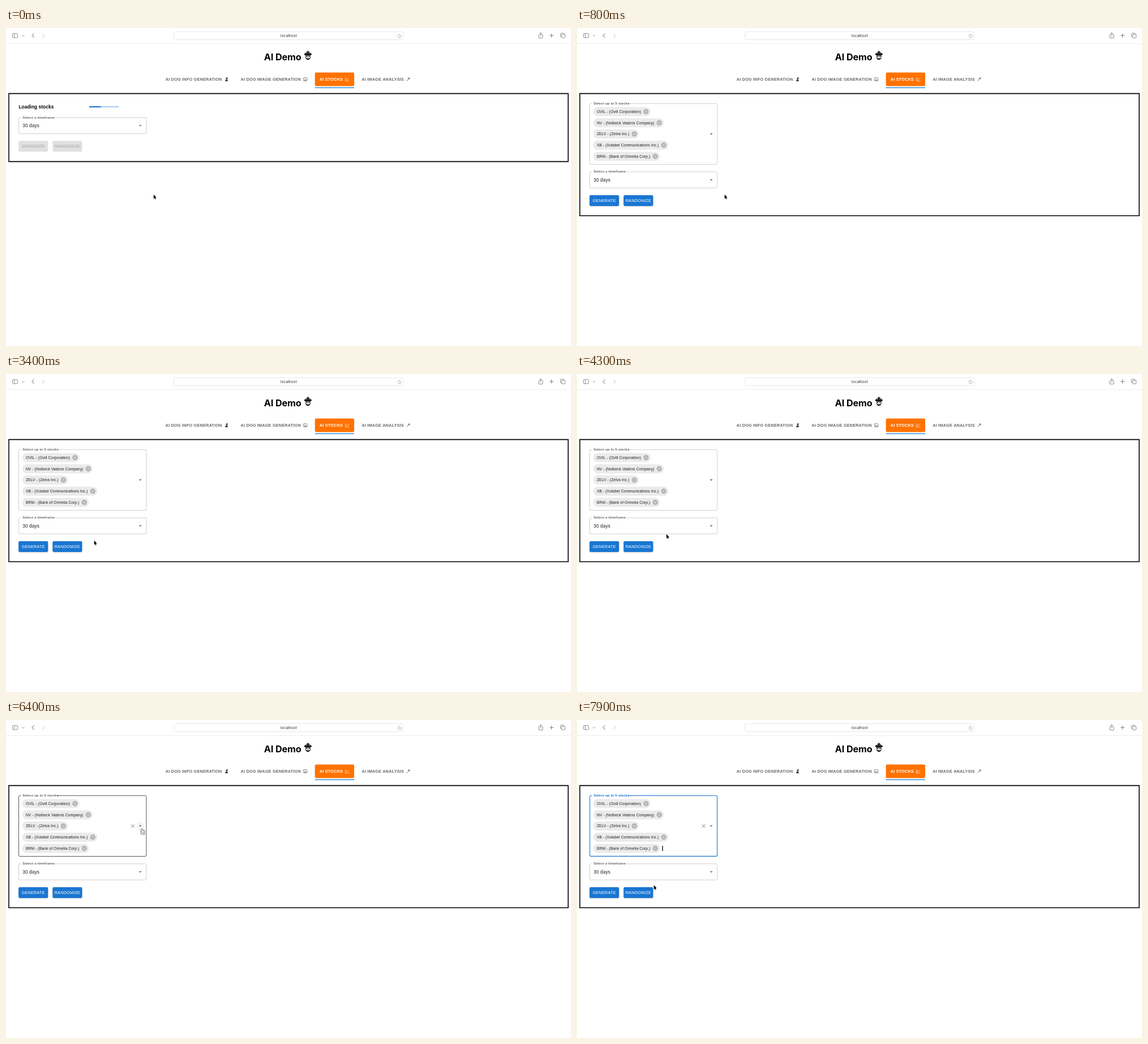
Recreate the animation shown at these times as an HTML page with a canvas. Size 998 px wide and 561 px high, loop 8 s.

```html
<!DOCTYPE html>
<html lang="en">
<head>
<meta charset="utf-8">
<title>AI Demo</title>
<style>
html, body { margin: 0; width: 100%; height: 100%; overflow: hidden; background: #fff; }
canvas { display: block; width: 998px; height: 561px; }
</style>
</head>
<body>
<canvas id="stage"></canvas>
<script>
const W = 998, H = 561, LOOP = 8000, STEP = 100;
const K = W / 1920; // page zoom
const SANS = '"Liberation Sans", Arial, sans-serif', INTER = 'Inter, sans-serif';
const BLUE = '#1976d2', ORANGE = '#ff7200', TOOL = '#707070';
const INK = 'rgba(0,0,0,.87)', GREY = 'rgba(0,0,0,.6)', ICON = 'rgba(0,0,0,.54)';
const LOADED = 500, OPEN = 6500, CLOSE = 7100;
const LEFT = 22.1, WIDE = 226.1, RIGHT = LEFT + WIDE, ROW = 38 * K;

const CHIPS = [
  'OVIL - (Ovill Corporation)',
  'NV - (Nolbeck Vadens Company)',
  'ZELV - (Zelva Inc.)',
  'XB - (Xolabel Communications Inc.)',
  'BRM - (Bank of Ormelia Corp.)'
];
const OPTIONS = [
  'KRUM - (Krumdal Inc.)', 'LOVD - (Lovedin Group)', 'MIRK - (Mirkane Foods Inc.)',
  'NULB - (Nulbera Corp.)', CHIPS[0], 'PADV - (Padvell Company)',
  'QEST - (Qestolan Inc.)', 'RUVO - (Ruvomar Holdings)', 'SILQ - (Silquane Corp.)',
  'TOBR - (Tobrenna Inc.)', 'UMLA - (Umlaric Energy Corp.)', 'WEXO - (Wexolind Inc.)'
];

// Pointer moves; a higher ease starts faster
const HOME = [261, 294];
const MOVES = [
  { from: 1000, until: 1900, to: [192.5, 278], ease: 1.5 },
  { from: 1900, until: 2300, to: [211, 275], ease: 1 },
  { from: 2300, until: 2800, to: [156, 271], ease: 1 },
  { from: 2900, until: 3400, to: [156, 294], ease: 3 },
  { from: 3400, until: 4200, to: [176, 274], ease: 1 },
  { from: 4200, until: 4800, to: [118, 303], ease: 2 },
  { from: 5300, until: 6100, to: [240, 193], ease: 5 },
  { from: 7300, until: 7700, to: [136, 291.6], ease: 1.5 }
];

const canvas = document.getElementById('stage');
const dpr = window.devicePixelRatio || 1;
canvas.width = W * dpr;
canvas.height = H * dpr;
const c = canvas.getContext('2d');

const clamp = v => Math.max(0, Math.min(1, v));
const ramp = (t, start, span) => clamp((t - start) / span);
const blend = (a, b, p) => a.map((v, i) => v + (b[i] - v) * p);
const rgb = (a, b, p) => `rgb(${blend(a, b, p).map(Math.round)})`;

function pointerAt(t) {
  return MOVES.reduce((pos, m) =>
    blend(pos, m.to, 1 - (1 - ramp(t, m.from, m.until - m.from)) ** m.ease), HOME);
}

// Text centred vertically on cy; returns its width
function text(str, x, cy, size, { color = INK, weight = 400, gap = 0.078, align = 'left', font = SANS } = {}) {
  c.font = `${weight} ${size}px ${font}`;
  c.letterSpacing = gap + 'px';
  c.textAlign = align;
  c.fillStyle = color;
  c.fillText(str, x, cy + size * 0.355);
  return c.measureText(str).width;
}

function measure(str, size) {
  c.font = `400 ${size}px ${SANS}`;
  c.letterSpacing = '0.078px';
  return c.measureText(str).width;
}

function box(x, y, w, h, r, fill) {
  c.beginPath();
  c.roundRect(x, y, w, h, r);
  c.fillStyle = fill;
  c.fill();
}

const disc = (x, y, r, fill) => box(x - r, y - r, 2 * r, 2 * r, r, fill);

function stroke(color, width) {
  c.strokeStyle = color;
  c.lineWidth = width;
  c.stroke();
}

function outline(x, y, w, h, r, color, width) {
  c.beginPath();
  c.roundRect(x, y, w, h, r);
  stroke(color, width);
}

function line(x0, y0, x1, y1, color, width) {
  c.beginPath();
  c.moveTo(x0, y0);
  c.lineTo(x1, y1);
  stroke(color, width);
}

function cross(x, y, r, color, width) {
  line(x - r, y - r, x + r, y + r, color, width);
  line(x + r, y - r, x - r, y + r, color, width);
}

// V shape whose tip points by quarter turns from down
function chevron(x, y, r, turns, color, width) {
  c.save();
  c.translate(x, y);
  c.rotate(turns * Math.PI / 2);
  c.beginPath();
  c.moveTo(-r, -r / 2);
  c.lineTo(0, r / 2);
  c.lineTo(r, -r / 2);
  stroke(color, width);
  c.restore();
}

function triangle(x, y, r, color) {
  c.beginPath();
  c.moveTo(x - Math.abs(r), y - r / 2);
  c.lineTo(x + Math.abs(r), y - r / 2);
  c.lineTo(x, y + r / 2);
  c.fillStyle = color;
  c.fill();
}

function toolbar() {
  box(0, 27, W, 0.6, 0, '#dedede');
  outline(11.4, 9.8, 9.2, 7.2, 1.4, TOOL, 0.8);
  line(14.5, 10, 14.5, 17, TOOL, 0.7);
  chevron(30, 13.6, 1.9, 0, TOOL, 0.8);
  chevron(47.7, 13.4, 3.6, 1, '#5c5c5c', 1);
  chevron(66.2, 13.4, 3.6, -1, '#c0c0c0', 0.9);

  outline(296.5, 6.5, 405, 14, 3.2, '#e2e2e2', 0.8);
  text('localhost', 499.2, 13.9, 6.75, { color: '#333', gap: 0, align: 'center', font: INTER });
  c.beginPath();
  c.arc(695.2, 14.2, 2.7, -0.9, 4.6);
  stroke('#888', 0.7);
  chevron(695.2, 11.4, 1.3, -1, '#888', 0.6);

  outline(941.2, 11.4, 6.8, 6.4, 0.8, TOOL, 0.8);
  box(943.2, 10.6, 2.8, 1.6, 0, '#fff');
  line(944.6, 14.6, 944.6, 8.4, TOOL, 0.8);
  chevron(944.6, 9.2, 1.9, 2, TOOL, 0.8);
  line(960, 13.3, 967.2, 13.3, TOOL, 0.9);
  line(963.6, 9.7, 963.6, 16.9, TOOL, 0.9);
  outline(979.4, 9.2, 6.2, 6.2, 1.2, TOOL, 0.8);
  box(981.4, 11.2, 6.6, 6.6, 1.2, '#fff');
  outline(981.4, 11.2, 6.2, 6.2, 1.2, TOOL, 0.8);
}

function robot(x) {
  box(x - 0.6, 40, 1.2, 2, 0.5, '#000');
  box(x - 4.6, 41.6, 9.2, 5, [4.6, 4.6, 0, 0], '#000');
  box(x - 6.4, 44.8, 12.8, 3, 1.2, '#000');
  box(x - 4.4, 48, 8.8, 8, [0.5, 0.5, 4.4, 4.4], '#000');
  box(x - 3.6, 48.8, 7.2, 5.2, [0, 0, 3, 3], '#fff');
  line(x - 2, 53, x + 2, 53, '#000', 0.7);
  for (const side of [-1, 1]) {
    disc(x + side * 2, 44.2, 0.9, '#fff');
    disc(x + side * 1.9, 50, 1.1, '#000');
  }
}

// Tab icons, drawn in a square 7.3 wide
function dogIcon(color) {
  box(1, 5.4, 5.6, 2, 1, color);
  box(2.6, 2, 2.9, 5, 1.2, color);
  box(3, 0.2, 3.4, 2.6, 0.9, color);
}

function pictureIcon(color) {
  outline(0.4, 0.9, 6.5, 5.7, 0.8, color, 0.7);
  triangle(2.6, 4.9, -1.6, color);
  triangle(4.8, 4.7, -1.7, color);
  disc(2, 2.4, 0.6, color);
}

function chartIcon(color) {
  line(0.5, 0.4, 0.5, 7, color, 0.7);
  line(0.2, 6.9, 7.2, 6.9, color, 0.7);
  line(1.8, 5, 3.4, 2.9, color, 0.7);
  line(3.4, 2.9, 4.7, 4, color, 0.7);
  line(4.7, 4, 7, 1.2, color, 0.7);
}

function wandIcon(color) {
  line(0.6, 7, 4.6, 2.8, color, 0.9);
  for (let i = 0; i < 5; i++) {
    const a = i * Math.PI * 0.4;
    line(5, 2.2, 5 + 2 * Math.sin(a), 2.2 - 2 * Math.cos(a), color, 0.8);
  }
}

function tabs() {
  const names = ['AI DOG INFO GENERATION', 'AI DOG IMAGE GENERATION', 'AI STOCKS', 'AI IMAGE ANALYSIS'];
  const icons = [dogIcon, pictureIcon, chartIcon, wandIcon];
  let x = 281.8;
  names.forEach((name, i) => {
    const active = name === 'AI STOCKS', color = active ? '#fff' : GREY;
    if (active) {
      box(x - 8.2, 78.4, 69.4, 24, 2.4, ORANGE);
      box(x - 8.2, 104.8, 69.4, 1.2, 0, BLUE);
    }
    const w = text(name, x, 90.4, 14 * K, { weight: 700, gap: 0.208, color });
    c.save();
    c.translate(x + w + 4.1, 86.7);
    icons[i](color);
    c.restore();
    x += w + 33;
  });
}

// Outlined input with a notch for its label; returns its middle
function field(top, height, label, hover, focus) {
  const width = focus ? 1.1 : 0.75, half = width / 2, size = 12 * K;
  const x = LEFT + half, right = RIGHT - half, y = top + half, bottom = top + height - half;
  const notch = LEFT + 4.4, r = 2;
  c.beginPath();
  c.moveTo(notch + measure(label, size) + 5.2, y);
  c.arcTo(right, y, right, bottom, r);
  c.arcTo(right, bottom, x, bottom, r);
  c.arcTo(x, bottom, x, y, r);
  c.arcTo(x, y, right, y, r);
  c.lineTo(notch, y);
  stroke(focus ? BLUE : hover ? INK : 'rgba(0,0,0,.25)', width);
  text(label, 29.3, top - 0.5, size, { weight: 700, color: focus ? BLUE : GREY });
  const cy = top + height / 2;
  if (hover || focus) cross(223.7, cy, 2.8, ICON, 0.9);
  return cy;
}

function chip(str, cy) {
  const size = 13 * K, x = 34.9, end = x + measure(str, size) + 8.8;
  box(28.6, cy - 8.1, end - 20.6, 16.2, 8.1, '#ebebeb');
  text(str, x, cy, size);
  disc(end, cy, 4.7, '#b4b4b4');
  cross(end, cy, 1.9, '#ebebeb', 0.8);
}

function button(str, x, cy, on, hover) {
  c.save();
  c.shadowColor = `rgba(0,0,0,${0.32 * on})`;
  c.shadowBlur = (1.8 + 2 * hover) * dpr;
  c.shadowOffsetY = (0.7 + 0.7 * hover) * dpr;
  const resting = blend([224, 224, 224], [25, 118, 210], on);
  box(x, cy - 9.5, 52, 19, 2.1, rgb(resting, [21, 101, 192], hover));
  c.restore();
  text(str, x + 26, cy, 14 * K, { gap: 0.208, align: 'center', color: rgb([166, 166, 166], [255, 255, 255], on) });
}

function loading(t) {
  text('Loading stocks', 22.4, 139.2, 16 * K, { weight: 700, color: '#000' });
  const x = 147, w = 100 * K, p = 0.21 + t * 0.0007;
  const start = clamp(1.35 * p - 0.35), end = clamp(1.9 * p);
  box(x, 138, w, 2.1, 0, '#a7caed');
  box(x + start * w, 138, (end - start) * w, 2.1, 0, BLUE);
}

function popup() {
  const top = 241, height = 222;
  c.save();
  c.shadowColor = 'rgba(0,0,0,.3)';
  c.shadowBlur = 1.6 * dpr;
  c.shadowOffsetY = 0.6 * dpr;
  box(LEFT, top, WIDE, height, 2.1, '#fff');
  c.restore();
  c.save();
  c.beginPath();
  c.rect(LEFT, top, WIDE, height);
  c.clip();
  const row = 36 * K;
  OPTIONS.forEach((str, i) => {
    const cy = top + 13.5 + i * row, chosen = CHIPS.includes(str);
    if (chosen) box(LEFT, cy - row / 2, WIDE, row, 0, '#dbe9f8');
    text(str, 30.6, cy, 16 * K, { color: chosen ? INK : 'rgba(0,0,0,.38)' });
  });
  c.restore();
}

function beam() {
  line(0, -3.6, 0, 3.6, '#000', 0.9);
  line(-1, 1.2, 1, 1.2, '#000', 0.7);
  for (const s of [-1, 1]) chevron(0, s * 3.8, 1.6, s + 1, '#000', 0.8);
}

function hand() {
  const parts = [[-1, -0.6, 1.9, 6], [-1, 2.4, 5.8, 6]];
  for (const p of parts) outline(...p, 1, '#000', 1.1);
  for (const p of parts) box(...p, 1, '#fff');
  for (const x of [1, 2.4, 3.6]) line(x, 4.6, x, 7, '#000', 0.4);
}

function arrow() {
  c.beginPath();
  c.moveTo(-0.3, -0.3);
  c.lineTo(-0.3, 6.8);
  c.lineTo(4.6, 4.9);
  c.closePath();
  c.moveTo(0.9, 4.8);
  c.lineTo(2.4, 8.2);
  c.lineTo(3.6, 7.7);
  c.lineTo(2.2, 4.4);
  c.closePath();
  stroke('#fff', 1.2);
  c.fillStyle = '#000';
  c.fill();
}

function render(t) {
  c.setTransform(dpr, 0, 0, dpr, 0, 0);
  c.fillStyle = '#fff';
  c.fillRect(0, 0, W, H);
  toolbar();
  text('AI Demo', 488.7, 51, 16.2, { weight: 700, color: '#000', gap: -0.1, align: 'center', font: INTER });
  robot(533.3);
  tabs();

  const loaded = t >= LOADED, focus = t >= OPEN, open = focus && t < CLOSE;
  const shift = loaded ? 95.6 : 0, timeTop = 157.8 + shift, stockTop = 133;
  const timeHeight = 56 * K, stockHeight = 107.9, buttonY = 208.8 + shift;
  const [px, py] = pointerAt(t);
  const over = (x, y, w, h) => px > x && px < x + w && py > y && py < y + h;
  const onStocks = loaded && over(LEFT, stockTop, WIDE, stockHeight);
  const onTime = over(LEFT, timeTop, WIDE, timeHeight);
  const onArrow = onStocks && Math.hypot(px - 237.2, py - 187) < 7.3;
  const onButton = loaded && over(82.4, buttonY - 9.5, 52, 19);

  outline(5, 115.6, 988, 120 + shift, 0, '#000', 1.6);

  if (loaded) {
    const cy = field(stockTop, stockHeight, 'Select up to 5 stocks', onStocks, focus);
    if (onArrow) disc(237.2, cy, 7.3, 'rgba(0,0,0,.04)');
    triangle(237.2, cy + 0.2, open ? -2.6 : 2.6, ICON);
    CHIPS.forEach((str, i) => chip(str, 147.5 + i * ROW));
    if (focus) box(150.5, 222, 1.3, 9, 0, '#000');
  } else {
    loading(t);
  }

  const cy = field(timeTop, timeHeight, 'Select a timeframe', onTime, false);
  triangle(237.2, cy + 0.2, 2.6, ICON);
  text('30 days', 29.3, cy, 16 * K);

  const on = ramp(t, LOADED, 250);
  const hover = ramp(t, 4450, 250) * (1 - ramp(t, 5380, 250));
  button('GENERATE', 22.2, buttonY, on, 0);
  button('RANDOMIZE', 82.4, buttonY, on, hover);

  if (open) popup();
  c.save();
  c.translate(px, py);
  if (onArrow || onButton) hand();
  else if (onStocks || onTime) beam();
  else arrow();
  c.restore();
}

const begin = performance.now();
function tick() {
  const t = (performance.now() - begin) % LOOP;
  render(Math.floor(t / STEP) * STEP);
  requestAnimationFrame(tick);
}
tick();
</script>
</body>
</html>
```
